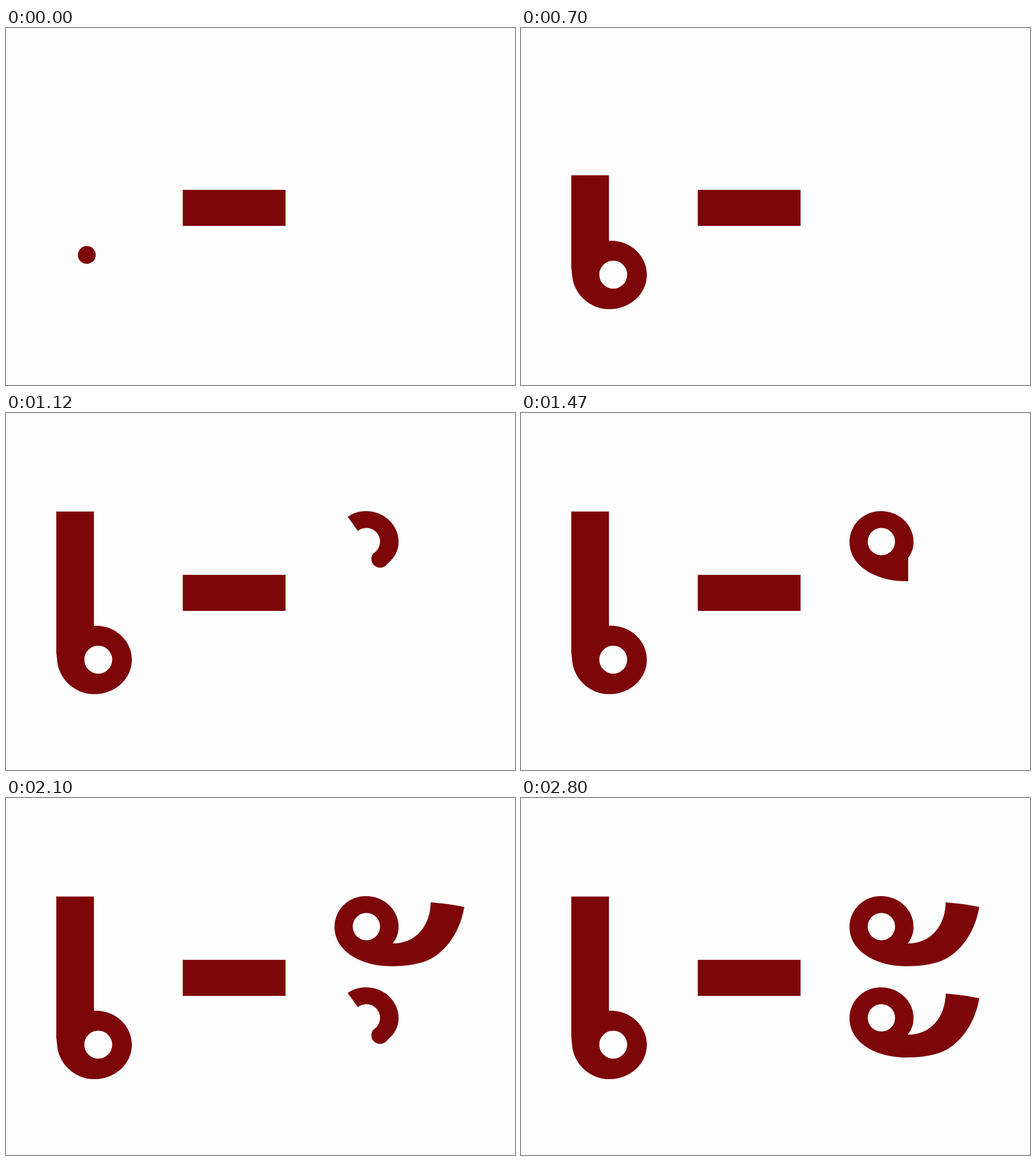
An HTML page for the animation above (3.36 s loop, 894x626 px).

```html
<!DOCTYPE html>
<html lang="en">
<head>
<meta charset="utf-8">
<title>Stroke order</title>
<style>
  html, body { margin: 0; width: 100%; height: 100%; overflow: hidden; background: #fdfdfd; }
  svg { display: block; fill: #7d0608; }
  .hole { fill: #fdfdfd; }
  mask path { fill: none; stroke: #fff; stroke-width: 72; }
</style>
</head>
<body>
<svg id="stage" width="894" height="626" viewBox="0 0 894 626">
  <rect x="310.5" y="283.8" width="180.5" height="63.2"/>
</svg>
<script>
const STEP = 70, LOOP = 3360, LAST = 40;
const stage = document.getElementById('stage');

// A glyph has a head (the loop) and a tail. Each part is an outline,
// uncovered along its spine in a given number of steps.
const stem = {
  dot: [142, 398, 15.7], hole: [162, 432.5, 24.5],
  parts: [{
    steps: 6,
    outline: 'M130 388C136 379 147 373 158 373A63 60 0 0 1 221 433A66 60 0 0 1 155 493A65.5 65 0 0 1 89.5 429L138 425L162 432L142 398Z',
    spine: 'M142 398C147 392 152 390 160 390A44 43 0 0 1 204 433A49 41 0 0 1 155 474A41 47 0 0 1 114 427'
  }, {
    steps: 6,
    outline: 'M88.3 172.5H154.5V434H90L88.3 420Z',
    spine: 'M121.4 430V172.5'
  }]
};
const curl = {
  dot: [657, 256, 15.3], hole: [633, 225.5, 24],
  parts: [{
    steps: 5.2,
    outline: 'M669 265C683 254 689.5 241 689.5 226A57.5 54 0 0 0 632 172A55 54 0 0 0 577 226H633L657 256Z',
    spine: 'M657 256C668 247 673 238 673 226A41 39 0 0 0 632 187A39 39 0 0 0 593 226'
  }, {
    steps: 8.8,
    outline: 'M577 226C577 268 622 295 677 295C705 295 730 291 748 281C778 263 798 231 805 191L746 180.5C746 226 718 255 680 255L657 245L633 226Z',
    spine: 'M593 226C593 256 630 275 680 275C735 275 770 240 775.5 186'
  }]
};

const circle = ([x, y, r], name) => `<circle class="${name}" cx="${x}" cy="${y}" r="${r}"/>`;

// Adds a glyph to the stage and returns a function that shows it after n steps.
function addGlyph({ dot, hole, parts }, id, dy = 0) {
  const shapes = parts.map(({ steps, outline, spine }, i) => `
    <mask id="${id}${i}"><path d="${spine}" pathLength="${steps}"/></mask>
    <path d="${outline}" mask="url(#${id}${i})"/>`).join('');
  stage.insertAdjacentHTML('beforeend',
    `<g transform="translate(0 ${dy})">${circle(dot, 'dot')}${shapes}${circle(hole, 'hole')}</g>`);
  const group = stage.lastElementChild;
  const spines = group.querySelectorAll('mask path');
  return (n, visible) => {
    group.style.display = visible ? '' : 'none';
    parts.forEach(({ steps }, i) => {
      const shown = Math.max(0, Math.min(steps, n));
      spines[i].setAttribute('stroke-dasharray', `${shown} 99`);
      n -= steps;
    });
  };
}

const showStem = addGlyph(stem, 'stem');
const showUpper = addGlyph(curl, 'upper');
const showLower = addGlyph(curl, 'lower', 160);

function tick() {
  const n = Math.min(LAST, Math.floor(performance.now() % LOOP / STEP));
  showStem(n, true);
  showUpper(n - 12, n > 12);
  showLower(n - 26, n > 26);
  requestAnimationFrame(tick);
}
tick();
</script>
</body>
</html>
```
